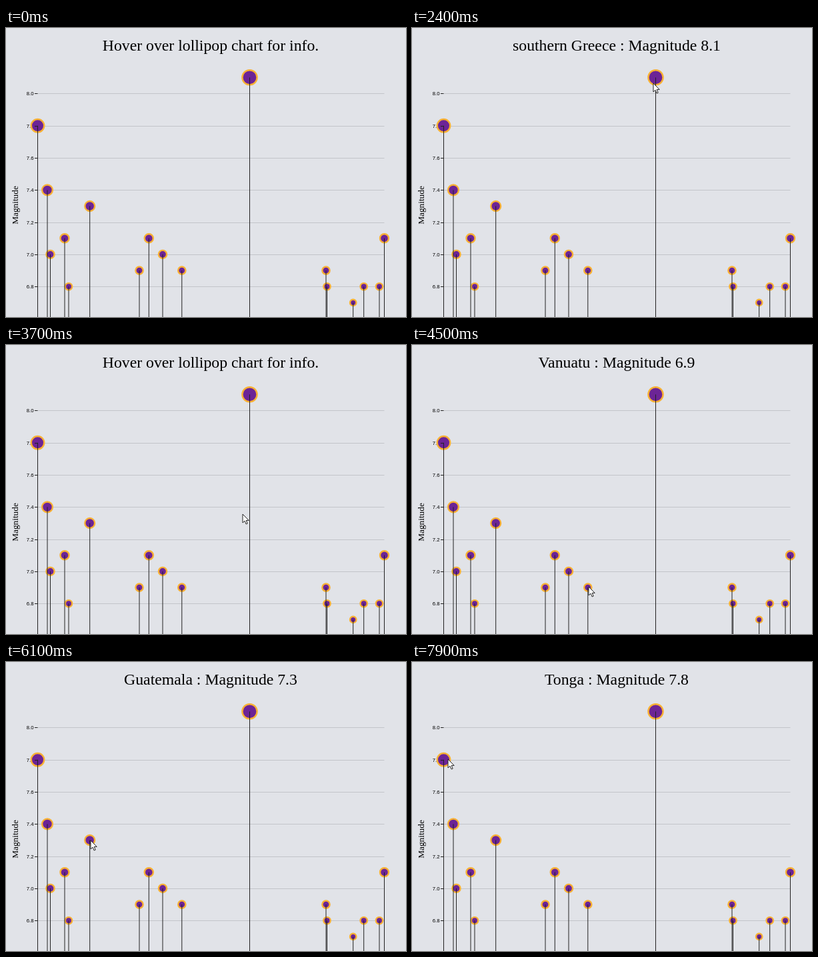
Animation, 600 px wide and 434 px high, one loop 8000 ms. Source, as an HTML page:

```html
<!DOCTYPE html>
<html lang="en">
<head>
<meta charset="utf-8">
<title>Lollipop chart</title>
<style>
  html, body { margin: 0; width: 100%; height: 100%; overflow: hidden; background: #e1e3e8; }
  svg { display: block; }
  text { fill: #000; font-family: "Liberation Serif", Times, serif; text-anchor: middle; }
  .tick { font: 7.8px "Liberation Sans", Arial, sans-serif; text-anchor: end; }
  .grid { stroke: #c2c4c9; }
  .mark { stroke: #222; }
  circle { fill: #6c2496; stroke: #f8b133; stroke-width: 2.4; }
</style>
</head>
<body>
<svg width="600" height="434" viewBox="0 0 600 434">
  <text id="title" x="307" y="34" font-size="23.75"></text>
  <text transform="translate(18 266) rotate(-90)" font-size="13.3">Magnitude</text>
  <g id="chart"></g>
  <path id="cursor" d="M0 0V13L3 10.2L5.2 15L7.2 14.1L5.2 9.4H9.2Z" fill="#fff" stroke="#222"/>
</svg>
<script>
const LOOP = 8000, TRAVEL = 400;
const HINT = 'Hover over lollipop chart for info.';
const $ = id => document.getElementById(id);

// x positions of the lollipops by magnitude
const groups = {
  '8.1': [365.5], '7.8': [47.5], '7.4': [62], '7.3': [125.7],
  '7.1': [88, 214.3, 567.5], '7.0': [66.5, 235], '6.9': [200, 263.8, 480],
  '6.8': [94, 481.5, 536.7, 560], '6.7': [520.7]
};
const places = { '8.1': 'southern Greece', '7.8': 'Tonga', '7.3': 'Guatemala', '6.9': 'Vanuatu' };

// pointer stops: arrival time, x, y
const stops = [
  [1900, 392, 170], [2300, 362, 83], [3500, 355, 254], [4300, 265, 363],
  [5300, 274, 342], [5950, 127, 268], [6950, 94, 131], [7500, 54, 146]
];

const yOf = m => 98.45 + (8 - m) * 241.5;
const radius = m => 5.9 + (m - 6.7) * 4.55;
const dots = Object.entries(groups).flatMap(([mag, xs]) =>
  xs.map(x => ({ x, y: yOf(mag), r: radius(mag), mag })));

const line = (cls, x1, y1, x2, y2) =>
  `<line class="${cls}" x1="${x1}" y1="${y1}" x2="${x2}" y2="${y2}"/>`;

function drawChart() {
  let grid = '', marks = '', circles = '';
  for (let i = 0; i < 7; i++) {
    const m = 8 - i * 0.2, y = Math.round(yOf(m)) + 0.5;
    grid += line('grid', 47, y, 567.5, y) +
      `<text class="tick" x="41.5" y="${y + 2.7}">${m.toFixed(1)}</text>`;
    marks += line('mark', 43, y, 47.5, y);
  }
  for (const { x, y, r } of dots) {
    circles += `<circle cx="${x}" cy="${y}" r="${r - 1.2}"/>`;
    marks += line('mark', x, y, x, 434);
  }
  $('chart').innerHTML = grid + circles + marks;
}

// rests at each stop, then eases to the next one just before its arrival time
function pointerAt(t) {
  const i = stops.findLastIndex(s => s[0] <= t);
  if (i < 0) return null;
  const [, x, y] = stops[i], [arrive, nx, ny] = stops[i + 1] || [Infinity, x, y];
  const u = Math.max(0, 1 - (arrive - t) / TRAVEL), e = u * u * (3 - 2 * u);
  return [x + (nx - x) * e, y + (ny - y) * e];
}

function render(t) {
  const tip = pointerAt(t);
  const hit = tip && dots.find(d => Math.hypot(tip[0] - d.x, tip[1] - d.y) < d.r);
  const place = hit && places[hit.mag];
  $('title').textContent = place ? `${place} : Magnitude ${hit.mag}` : HINT;
  $('cursor').style.display = tip ? '' : 'none';
  if (tip) $('cursor').setAttribute('transform', `translate(${tip})`);
}

drawChart();
const start = performance.now();
function frame() {
  const t = (performance.now() - start) % LOOP;
  render(Math.floor(t / 100) * 100);
  requestAnimationFrame(frame);
}
frame();
</script>
</body>
</html>
```
